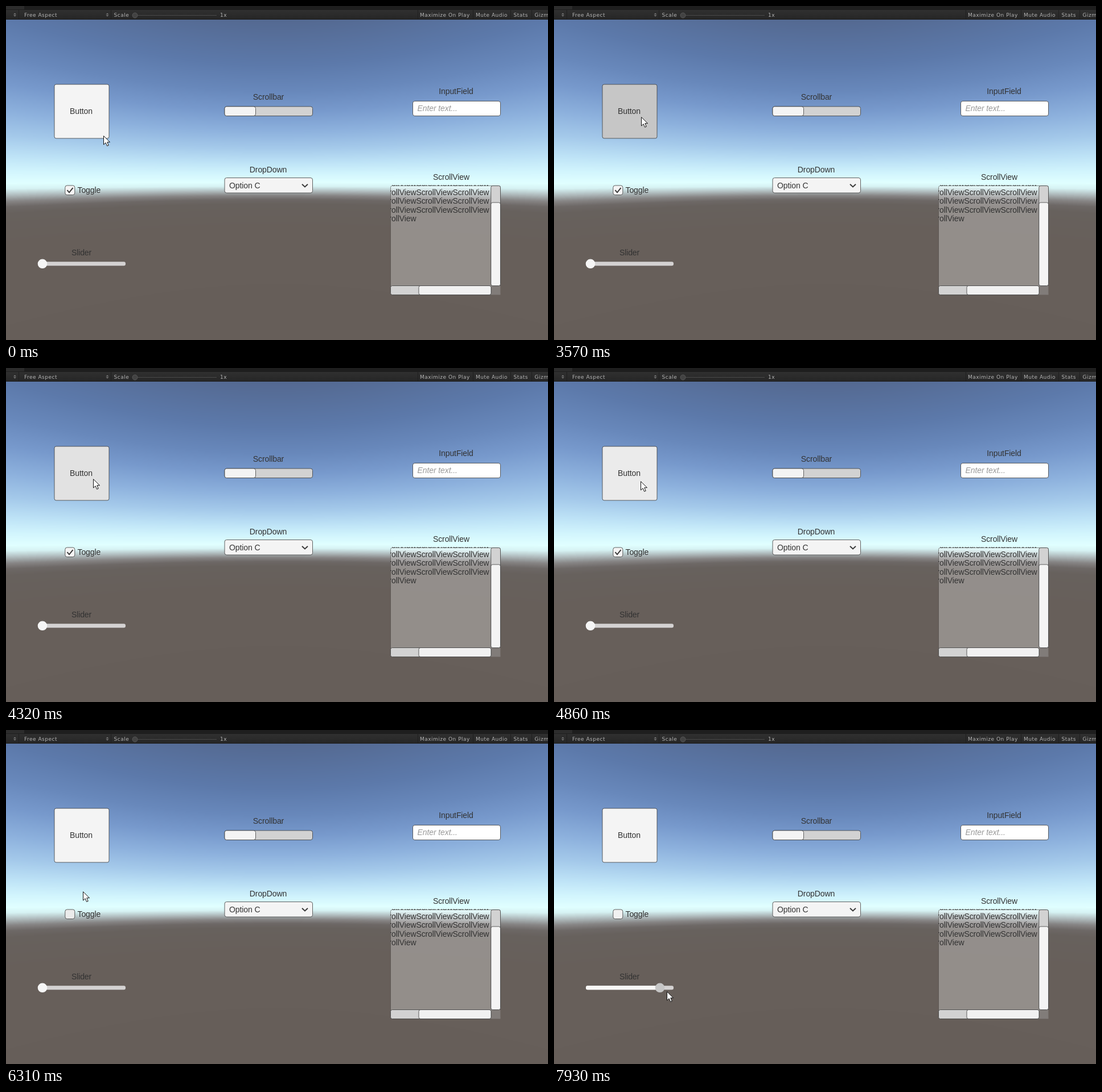
An HTML page with a canvas that plays this animation: 952x588 px, repeating every 7.99 s.

```html
<!DOCTYPE html>
<html lang="en">
<head>
<meta charset="utf-8">
<title>UI controls</title>
<style>
  html, body { margin: 0; width: 100%; height: 100%; overflow: hidden; background: #665e59; }
  canvas, svg { position: absolute; left: 0; top: 0; display: block; }
  text { font: 14px "Liberation Sans", Arial, sans-serif; letter-spacing: -.1px; fill: #323232; }
  .mid { text-anchor: middle; }
  .bar text { font: 9px "DejaVu Sans", sans-serif; letter-spacing: .5px; fill: #b4b4b4; }
  .box { stroke: #3c3c3c; stroke-opacity: .8; }
  .light { fill: #f4f4f4; }
  .track { fill: #d2d2d2; }
  .line { fill: none; stroke: #3a3a3a; stroke-width: 2; }
</style>
</head>
<body>
<canvas id="sky" width="952" height="588"></canvas>
<svg width="952" height="588" viewBox="0 0 952 588">
  <defs>
    <linearGradient id="barFill" x2="0" y2="1">
      <stop stop-color="#303030"/><stop offset="1" stop-color="#262626"/>
    </linearGradient>
    <clipPath id="view"><rect x="675" y="315.3" width="176.5" height="177"/></clipPath>
    <path id="pick" d="M0 2.2L2.5 0L5 2.2ZM0 3.8L2.5 6L5 3.8Z" fill="#808080"/>
  </defs>

  <g class="bar">
    <rect width="952" height="24" fill="#1e1e1e"/>
    <rect width="32" height="6" fill="#2c2c2c"/>
    <rect y="7" width="952" height="16" fill="url(#barFill)"/>
    <path d="M22.5 7V23M184.5 7V23M723.5 7V23M820.5 7V23M886.5 7V23M923.5 7V23" stroke="#1f1f1f"/>
    <use href="#pick" x="13" y="12.5"/>
    <use href="#pick" x="175.500" y="12.5"/>
    <text x="32" y="19">Free Aspect</text>
    <text x="189.500" y="19">Scale</text>
    <path d="M231 16.500H370" stroke="#4a4a4a"/>
    <circle cx="226.500" cy="16.500" r="4.500" fill="#434343" stroke="#575757"/>
    <text x="376" y="19">1x</text>
    <text x="727" y="19">Maximize On Play</text>
    <text x="825" y="19">Mute Audio</text>
    <text x="891.500" y="19">Stats</text>
    <text x="928.500" y="19">Gizmos</text>
  </g>

  <rect id="button" class="box" x="85" y="138" width="96" height="95" rx="3"/>
  <text class="mid" x="132" y="190">Button</text>

  <text class="mid" x="461" y="164.500">Scrollbar</text>
  <rect class="box track" x="384" y="177" width="154.500" height="16.500" rx="3.500"/>
  <rect class="box light" x="384" y="177" width="54.500" height="16.500" rx="3.500"/>

  <text class="mid" x="790.500" y="154.500">InputField</text>
  <rect class="box" x="714.500" y="167.500" width="154" height="26" rx="3.500" fill="#fff"/>
  <text x="722.500" y="185" style="font-style:italic;fill:#999">Enter text...</text>

  <rect id="toggle" class="box" x="103.800" y="316" width="17" height="16.500" rx="3.500"/>
  <path id="check" class="line" d="M107.500 324.200L111 328.300L117.500 320.200"/>
  <text x="125.500" y="329">Toggle</text>

  <text class="mid" x="460.500" y="292.500">DropDown</text>
  <rect class="box light" x="384" y="302.500" width="154.500" height="26.500" rx="3.500"/>
  <text x="392" y="321">Option C</text>
  <path class="line" d="M520 313.800L525 318.500L530 313.800"/>

  <text class="mid" x="782" y="305.500">ScrollView</text>
  <rect x="675.500" y="316.500" width="193" height="192" rx="3" fill="#fff" fill-opacity=".29" stroke="#4a4643" stroke-opacity=".6"/>
  <rect x="852.500" y="493" width="16" height="15.500" fill="#817c79"/>
  <g id="rows" clip-path="url(#view)"></g>
  <rect class="box track" x="851.800" y="316.500" width="16.700" height="176" rx="3"/>
  <rect class="box light" x="851.800" y="346" width="16.700" height="146.500" rx="3"/>
  <rect class="box track" x="675.500" y="492.500" width="176.500" height="16" rx="3"/>
  <rect class="box" x="725" y="492.500" width="127" height="16" rx="3" fill="#f1f1f1"/>

  <text class="mid" x="132.500" y="439">Slider</text>
  <rect x="56" y="450.200" width="154" height="7" rx="3" fill="#d4d2d2"/>
  <rect id="fill" x="56" y="450.200" height="7" rx="3" fill="#f8f7f6"/>
  <circle id="knob" cy="453.800" r="8.300"/>

  <path id="cursor" d="M.5 .7V16L4.100 12.700L6.600 18.400L9.200 17.300L6.800 11.700H11.500Z" fill="#fff" stroke="#111"/>
</svg>
<script>
const LOOP = 7990;
const $ = id => document.getElementById(id);

// Colours by height on the centre column, spread along lines of equal elevation.
const stops = [
  [24, 84, 105, 145], [104, 92, 121, 170], [150, 104, 136, 187], [185, 119, 153, 204],
  [220, 141, 177, 221], [250, 164, 201, 234], [275, 189, 226, 246], [295, 210, 245, 253],
  [310, 224, 255, 255], [317, 214, 242, 243], [325, 176, 188, 190], [333, 134, 132, 132],
  [340, 109, 104, 102], [348, 103, 97, 93], [390, 103, 95, 90], [588, 102, 94, 89]
];

function skyColour(y) {
  if (y <= stops[0][0]) return stops[0].slice(1);
  const i = stops.findIndex(s => s[0] >= y);
  if (i < 0) return stops[stops.length - 1].slice(1);
  const a = stops[i - 1], b = stops[i], p = (y - a[0]) / (b[0] - a[0]);
  return [1, 2, 3].map(c => a[c] + (b[c] - a[c]) * p);
}

function drawSky() {
  const W = 952, H = 588, horizon = 306, focal = 488;
  const ctx = $("sky").getContext("2d"), img = ctx.createImageData(W, H);
  const ramp = Array.from({ length: H * 4 }, (_, i) => skyColour(i / 4));
  for (let x = 0; x < W; x++) {
    const shrink = focal / Math.hypot(focal, x - W / 2);
    for (let y = 0; y < H; y++) {
      const c = ramp[Math.round((horizon + (y - horizon) * shrink) * 4)];
      img.data.set([c[0], c[1], c[2], 255], (y * W + x) * 4);
    }
  }
  ctx.putImageData(img, 0, 0);
}

function addRows() {
  for (let i = 0; i < 5; i++) {
    const row = document.createElementNS("http://www.w3.org/2000/svg", "text");
    row.setAttribute("x", 656.3);
    row.setAttribute("y", 317 + i * 15.6);
    row.textContent = "ScrollView".repeat(i < 4 ? 3 : 1);
    $("rows").append(row);
  }
}

const linear = p => p;
const smooth = p => p * p * (3 - 2 * p);
const easeOut = p => 1 - (1 - p) ** 2;

// Pointer moves: start, end, steps, target x, target y, easing
const start = [171, 228];
const moves = [
  [30, 360, 7, 153, 195, easeOut],
  [4860, 5430, 10, 120, 320, smooth],
  [5490, 5610, 3, 115, 314, easeOut],
  [5920, 6010, 3, 138, 275, linear],
  [6250, 7030, 14, 75, 443, smooth],
  [7060, 7180, 3, 70, 460, easeOut],
  [7360, 7930, 10, 198, 460, linear]
];

function pointer(t) {
  let [x, y] = start;
  for (const [from, to, n, tx, ty, ease] of moves) {
    if (t < from) break;
    const step = Math.min(n, 1 + Math.floor((t - from) / (to - from) * (n - 1) + 1e-6));
    const p = ease(step / n);
    x += (tx - x) * p;
    y += (ty - y) * p;
  }
  return [Math.round(x), Math.round(y)];
}

// Grey levels over time; each holds until the next.
const buttonTint = [[0, 244], [3570, 198], [3630, 200], [3780, 220], [3840, 242], [4020, 220],
  [4080, 200], [4230, 204], [4290, 216], [4320, 226], [4500, 200], [4620, 235], [5610, 244]];
const toggleTint = [[0, 244], [5370, 226], [5610, 200], [5920, 216], [5960, 226], [6010, 235], [7360, 241]];
const knobTint = [[0, 245], [7030, 238], [7360, 216], [7420, 198]];

function tint(id, levels, t) {
  const g = levels.filter(l => l[0] <= t).pop()[1];
  $(id).setAttribute("fill", `rgb(${g},${g},${g})`);
}

function render(t) {
  const [x, y] = pointer(t);
  const knob = t < 7360 ? 64 : 64 + (x - 70) * 122 / 128;
  $("cursor").setAttribute("transform", `translate(${x} ${y})`);
  $("knob").setAttribute("cx", knob);
  $("fill").setAttribute("width", knob - 56);
  $("check").setAttribute("visibility", t < 5920 ? "visible" : "hidden");
  tint("button", buttonTint, t);
  tint("toggle", toggleTint, t);
  tint("knob", knobTint, t);
}

drawSky();
addRows();
const begin = performance.now();
function tick() {
  render((performance.now() - begin) % LOOP);
  requestAnimationFrame(tick);
}
tick();
</script>
</body>
</html>
```
